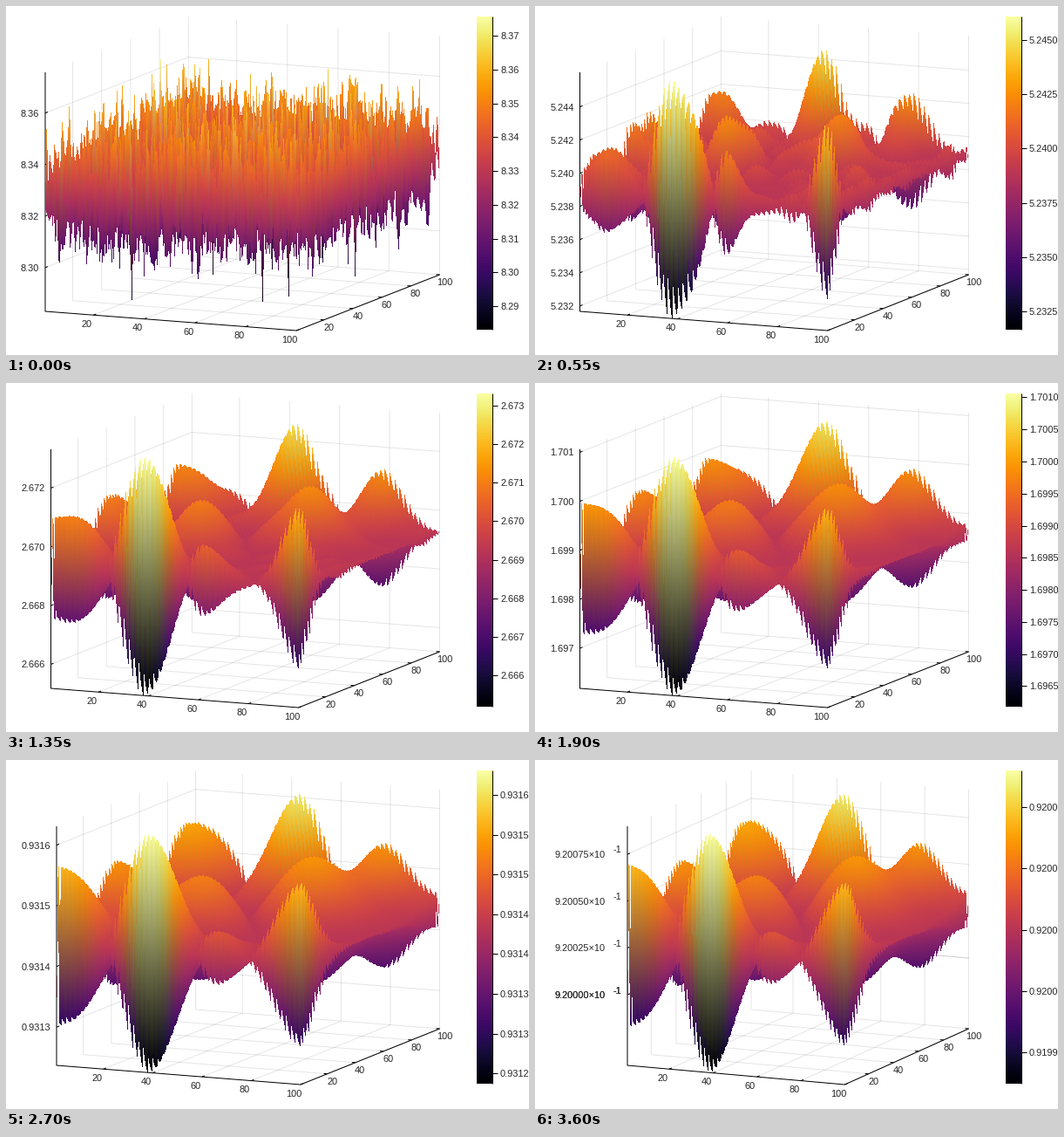
A matplotlib script for the animation above (4.1 s loop, 600 by 400 pixels).

```python
import math

import matplotlib.pyplot as plt
import numpy as np
from matplotlib.animation import FuncAnimation
from matplotlib.collections import LineCollection

N = 100
W, H = 600, 400
LAST, FRAMES = 72, 82
SPREAD = 2.1
RIGHT, TOP, HEIGHT = 497.5, 76, 274
INK = "#262626"

# step, middle of the value range, size of the range
KEYS = np.array([
    (0, 8.3294, 0.0928), (5, 6.76535, 0.0162), (17, 4.05682, 0.0132),
    (27, 2.66925, 0.00814), (38, 1.69862, 0.00488), (50, 1.035, 0.0026),
    (54, 0.931434, 0.000394), (60, 0.9200261, 0.0001276),
])

# u, v, height at step 17 and initial width in cells
BUMPS = [
    (0.38, 0.0, 1.0, 4.5), (0.41, 1.0, -0.65, 8.5), (1.0, 0.04, 0.52, 4.5),
    (0.1, 0.0, -0.46, 5), (0.0, 0.42, -0.42, 6), (0.02, 0.86, 0.4, 5),
    (0.22, 1.0, 0.38, 5), (0.77, 1.0, 0.46, 5), (0.35, 0.44, -0.4, 4.5),
    (0.65, 0.68, 0.4, 7), (0.6, 0.0, -0.3, 4.5),
]

modes = np.arange(N)
norm = np.where(modes == 0, math.sqrt(1 / N), math.sqrt(2 / N))


def basis(pos):
    return norm * np.cos(np.pi * np.outer(pos, modes))


def decay(variance):
    d = np.exp(-(np.pi * modes / N) ** 2 * variance / 2)
    return np.outer(d, d)


def start_spectrum():
    """Seeded fine noise plus bumps that reach their height at step 17."""
    noise = 3 * np.random.default_rng(3).normal(size=(N, N))
    noise[np.hypot(*np.meshgrid(modes, modes)) < 8] = 0
    for u, v, height, width in BUMPS:
        site = np.outer(basis([u]), basis([v]))
        spec = site * decay(width ** 2)
        noise += height * spec / np.sum(site * spec * decay(SPREAD * 17))
    return noise


spectrum = start_spectrum()
cells = basis((modes + 0.5) / N)
sign = 1 - 2 * (np.add.outer(modes, modes) % 2)


def field(n):
    """Alternating surface scaled to -1..1, diffusing with time."""
    tau = min(n, 52 + 0.1 * max(n - 52, 0))
    amp = cells @ (spectrum * decay(SPREAD * tau)) @ cells.T
    return (sign * amp / np.abs(amp).max()).ravel()


def cut_mesh(left, wx, wy):
    """Where each pixel column cuts the mesh edges, ordered front to back."""
    m = N - 1
    cols = np.arange(math.ceil(left), int(RIGHT))
    s = m * (cols[:, None] + 0.5 - left)
    k, k2 = np.arange(N), np.arange(2 * N - 1)
    cuts = np.hstack([k + 0 * s, (s - wx * k) / wy, (k2 - s / wx) / (1 - wy / wx)])
    v = np.sort(np.clip(cuts, np.maximum(0, (s - m * wx) / wy), np.minimum(m, s / wy)))
    u = np.clip((s - wy * v) / wx, 0, m)
    i, j = (np.minimum(a.astype(int), m - 1) for a in (u, v))
    f, g = u - i, v - j
    low = f + g <= 1
    p = i * N + j
    corners = np.stack([np.where(low, p, p + N + 1), p + N, p + 1])
    weights = np.stack([np.abs(1 - f - g), np.where(low, f, 1 - g), np.where(low, g, 1 - f)])
    return cols, corners, weights, (22 * u - 64 * v) / m


meshes = {}
cmap = plt.get_cmap("inferno")
rows = np.arange(H) + 0.5


def render(z, left, wx, wy):
    """Front-to-back floating horizon with colours blended between vertices."""
    if left not in meshes:
        meshes[left] = cut_mesh(left, wx, wy)
    cols, corners, weights, base = meshes[left]
    y = TOP + HEIGHT * (1 - (np.sum(z[corners] * weights, axis=0) + 1) / 2) + base
    upper = -np.minimum.accumulate(y, axis=1)
    lower = np.maximum.accumulate(y, axis=1)
    hit = np.array([np.where(rows < y[c, 0], np.searchsorted(upper[c], -rows),
                             np.searchsorted(lower[c], rows))
                    for c in range(len(cols))])
    c, r = np.nonzero((hit > 0) & (hit < y.shape[1]))
    b = hit[c, r]
    a = b - 1
    t = (rows[r] - y[c, a]) / (y[c, b] - y[c, a])
    rgba = cmap((z + 1) / 2)

    def colour(q):
        return sum(rgba[corners[n, c, q]] * weights[n, c, q][:, None] for n in range(3))

    image = np.zeros((H, W, 4))
    image[r, cols[c]] = colour(a) * (1 - t)[:, None] + colour(b) * t[:, None]
    return np.clip(image, 0, 1)


def split(span):
    e = math.floor(math.log10(span))
    return span / 10 ** e, e


def axis_ticks(lo, hi):
    """Tick values, labels, exponent flag and whether the first is doubled."""
    m, e = split(hi - lo)
    if m < 1.3:
        q, digits = 0.25, 2 - e
    elif m < 2:
        q, digits = 0.2, 1 - e
    elif m < 3.5:
        q, digits = 0.5, 1 - e
    else:
        q, digits = (1 if m < 7 else 2), -e
    step = q * 10.0 ** e
    ks = list(range(math.ceil(lo / step), math.floor(hi / step) + 1))
    double = (ks[0] + 1) % 10 == 0
    if len(ks) >= 6:
        ks.pop()
    if double:
        ks.pop(0)
    values = [k * step for k in ks]
    sci = values[-1] - values[0] < 0.99e-4
    if sci:
        labels = [f"{v * 10:.{digits - 1}f}×10" for v in values]
    else:
        labels = [f"{v:.{digits}f}" for v in values]
    return values, labels, sci, double


def bar_ticks(lo, hi):
    m, e = split(hi - lo)
    q, digits = (0.25, 2 - e) if m <= 2.5 else (0.5, 1 - e) if m <= 5 else (1, -e)
    step, digits = q * 10.0 ** e, min(digits, 4)
    for k in range(math.ceil(lo / step), math.floor(hi / step) + 1):
        cut = math.floor(k * step * 10 ** digits + 1e-6) / 10 ** digits
        yield k * step, f"{cut:.{digits}f}"


fig = plt.figure(figsize=(W / 100, H / 100), dpi=100, facecolor="white")
ax = fig.add_axes([0, 0, 1, 1])
ax.axis("off")
ax.imshow(np.linspace(1, 0, 256)[:, None], cmap=cmap, aspect="auto",
          extent=(540, 558, 371, 12), interpolation="nearest")
surface = ax.imshow(np.zeros((H, W, 4)), aspect="auto", extent=(0, W, H, 0),
                    interpolation="nearest", zorder=2)
ax.set_xlim(0, W)
ax.set_ylim(H, 0)


def label(x, y, s, ha="center"):
    ax.text(x, y, s, ha=ha, va="center_baseline", color=INK,
            fontname="Liberation Sans", fontsize=7.9)


def lines(segs, color, alpha=1.0):
    ax.add_collection(LineCollection(segs, colors=color, alpha=alpha,
                                     linewidths=0.72, zorder=1), autolim=False)


def draw(frame):
    n = min(frame, LAST)
    for artist in [*ax.collections, *ax.texts]:
        artist.remove()

    steps, mids, spans = KEYS.T
    mid = math.exp(np.interp(n, steps, np.log(mids)))
    span = math.exp(np.interp(math.sqrt(n), np.sqrt(steps), np.log(spans)))
    lo, hi = mid - span / 2, mid + span / 2
    values, names, sci, double = axis_ticks(lo, hi)
    left = 106 if sci else 45 + 6.5 * (len(names[0]) - 4)
    wx = 0.637 * (RIGHT - left)
    wy = RIGHT - left - wx

    def at(u, v, h=0.0):
        return left + wx * u + wy * v, TOP + HEIGHT * (1 - h) + 22 * u - 64 * v

    grid = []
    marks = [[at(0, 0, 1), at(0, 0), at(1, 0), at(1, 1)]]
    for t in range(20, 101, 20):
        f = (t - 1) / 99
        grid += [[at(0, f, 1), at(0, f), at(1, f)], [at(f, 1, 1), at(f, 1), at(f, 0)]]
        x, y = at(f, 0)
        marks.append([(x, y), (x + 3, y - 1.2)])
        label(x - 7.5, y + 9.5, str(t))
        x, y = at(1, f)
        marks.append([(x, y), (x - 4, y - 0.3)])
        label(x + 5.5, y + 8.5, str(t))

    for k, (value, name) in enumerate(zip(values, names)):
        h = (value - lo) / span
        x, y = at(0, 0, h)
        marks.append([(x, y), (x + 3, y - 1.2)])
        for _ in range(2 if double and k == 0 else 1):
            grid.append([(x, y), at(0, 1, h), at(1, 1, h)])
            label(x - (25 if sci else 7), y, name, "right")
            if sci:
                label(x - 7, y - 5.5, "-1", "right")

    for value, name in bar_ticks(lo, hi):
        y = 371 - 359 * (value - lo) / span
        marks.append([(558, y), (564, y)])
        label(567, y, name, "left")
    marks.append([(558, 12), (558, 371)])

    lines(grid, "black", 0.1)
    lines(marks, "black")
    surface.set_data(render(field(n), left, wx, wy))
    return []


anim = FuncAnimation(fig, draw, frames=FRAMES, interval=50, repeat=True,
                     init_func=lambda: [], blit=False)
plt.show()
```
